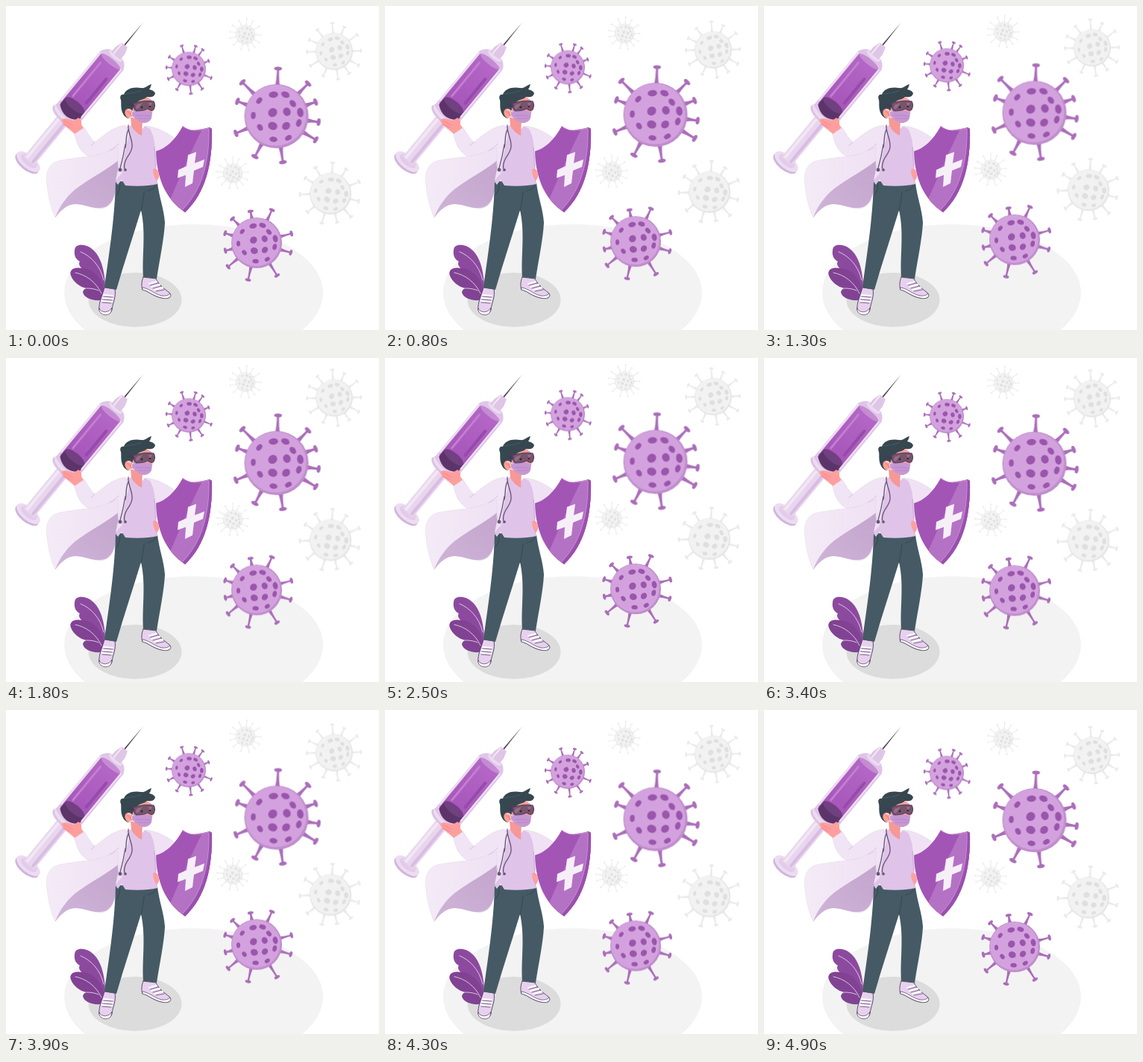
An HTML page for the animation above (5000 ms loop, 500 by 435 pixels).

```html
<!DOCTYPE html>
<html lang="en">
<head>
<meta charset="utf-8">
<title>Vaccine hero</title>
<style>
html, body { margin: 0; width: 100%; height: 100%; overflow: hidden; background: #fff; }
svg { display: block; width: 500px; height: 435px; }
.bob { animation: bob 2.5s cubic-bezier(.37, 0, .63, 1) infinite alternate; }
@keyframes bob { to { transform: translateY(calc(var(--rise) * -1px)); } }
</style>
</head>
<body>
<svg viewBox="0 0 500 435" xmlns="http://www.w3.org/2000/svg" fill="none" stroke-linecap="round" stroke-linejoin="round">
  <defs>
    <linearGradient id="liquid" x1="0" x2="1" y1="0" y2="0">
      <stop offset="0" stop-color="#a452b8"/><stop offset="1" stop-color="#b468c6"/>
    </linearGradient>
    <linearGradient id="lining" x1="1" x2="0" y1="0" y2="1">
      <stop offset="0" stop-color="#c3a4cd"/><stop offset="1" stop-color="#d0b5d8"/>
    </linearGradient>
    <linearGradient id="cloth" x1="0" x2="1" y1="0" y2="0">
      <stop offset="0" stop-color="#f4ebf7"/><stop offset="1" stop-color="#efe0f3"/>
    </linearGradient>
    <clipPath id="plate"><path d="M237 161C243 166 250 168 257 166Q266 165 273 163L276 165C277 211 268 251 240 277C216 261 202 234 201 195Q222 189 237 161Z"/></clipPath>
  </defs>

  <!-- floor -->
  <ellipse cx="251.500" cy="385" rx="173.500" ry="92" fill="#f3f3f3"/>
  <ellipse cx="173" cy="394.500" rx="62.500" ry="36.500" fill="#dcdcdc"/>

  <!-- leaves -->
  <path d="M92 328C92 321 100 319 108 322C122 327 132 345 133 376L130 380C124 369 117 363 108 357C100 352 96 347 99 343C93 340 91 334 92 328Z" fill="#8c4a9f"/>
  <path d="M87 362C84 354 92 350 101 352C118 352 130 367 132 384L127 395C114 396 104 391 103 384Q104 380 108 379C98 377 90 370 87 362Z" fill="#814293"/>
  <path d="M100 330C114 336 126 348 131 368M93 358C108 361 121 371 128 386M108 379Q118 379 124 382" stroke="#e7d2ec" stroke-width=".9"/>

  <!-- cape -->
  <path d="M149 190C128 203 98 202 70 208C57 212 53 223 55 240C57 258 60 271 66 284C72 275 80 266 92 265C105 265 114 272 127 272C139 271 145 262 148 245L158 190Z" fill="url(#cloth)" stroke="#e3d5e8" stroke-width=".5"/>
  <path d="M153 205C139 218 113 231 93 246C80 257 71 270 66 284C74 274 81 267 92 266C105 266 114 272 127 271C139 270 145 262 148 240Z" fill="url(#lining)"/>

  <!-- shoes -->
  <g stroke="#4c3b5e" stroke-width=".9">
    <path d="M132 378L146 380C148 391 143 398 142 408C140 416 127 416 125 408C124 398 129 389 132 378Z" fill="#e8d0ef"/>
    <path d="M125 406C127 412 138 413 142 405L141 410C139 417 127 416 125 409Z" fill="#fff" stroke-width=".7"/>
    <path d="M131 388L143 389M130 392L143 393M129 396L142 397" stroke="#fff" stroke-width="2"/>
    <path d="M131 390L143 391M130 394L142 395M129 398L141 399" stroke-width=".7"/>
    <path d="M184 364L201 366C205 375 213 380 219 385C224 391 217 394 209 392C197 390 190 382 183 381C181 375 182 369 184 364Z" fill="#e8d0ef"/>
    <path d="M183 378C192 379 199 387 209 389Q216 390 220 386C223 391 217 394 209 392C198 390 190 382 183 381Z" fill="#fff" stroke-width=".7"/>
    <path d="M192 373L202 370M195 377L206 374M199 381L210 378" stroke="#fff" stroke-width="2"/>
    <path d="M193 375L204 372M197 379L208 376M201 383L212 381" stroke-width=".7"/>
  </g>

  <!-- trousers -->
  <path d="M147 235L203 237C205 256 212 273 213 291C212 312 206 340 202 366L184 364C182 335 188 306 181 274C170 310 158 346 148 381L132 378C137 340 146 286 147 235Z" fill="#455a64"/>
  <path d="M181 275Q184 262 185 250M153 238Q153 249 148 254M202 240Q198 247 190 248" stroke="#364850" stroke-width="1"/>

  <!-- far arm and coat -->
  <path d="M188 161C204 163 218 171 229 180L222 193L207 193L200 220L196 190Z" fill="#f0e2f4" stroke="#e0d0e6" stroke-width=".5"/>

  <!-- shirt -->
  <path d="M160 163L168 160Q178 173 186 161L193 165C202 180 200 202 201 220L203 239Q185 243 160 241L155 233L150 240L147 236C152 213 153 188 160 163Z" fill="#e0c3e9"/>
  <path d="M199 190L202 235" stroke="#cca9d8" stroke-width="1"/>

  <!-- syringe, drawn along its own axis -->
  <g transform="translate(30 209) rotate(-50.500)">
    <ellipse cx="-3" rx="9" ry="19" fill="#d3b3dd"/>
    <ellipse cx="0" rx="9" ry="19" fill="#ecdcf1"/>
    <ellipse cx="1" rx="6" ry="13" fill="#e2cce9"/>
    <rect x="1" y="-9" width="88" height="18" fill="#e8d5ee"/>
    <path d="M4 5H88" stroke="#d8bce1" stroke-width="4"/>
    <path d="M4 -5H88" stroke="#f2e6f5" stroke-width="4"/>
    <ellipse cx="79" rx="9" ry="22" fill="#dcc2e4"/>
    <ellipse cx="82" rx="9" ry="21" fill="#ecdcf1"/>
    <path d="M82 -20H176Q185 -17 187 -8V8Q185 17 176 20H82Q73 0 82 -20Z" fill="#dfc5e7"/>
    <path d="M88 -17H174Q180 0 174 17H88Q78 0 88 -17Z" fill="url(#liquid)"/>
    <path d="M86 -16H98Q107 0 98 16H86Q73 0 86 -16Z" fill="#5d3469"/>
    <ellipse cx="98" rx="6" ry="16" fill="#714080"/>
    <ellipse cx="174" rx="4" ry="16" fill="#c48bd2"/>
    <path d="M106 -10H164" stroke="#c27fd1" stroke-width="3"/>
    <path d="M92 17H174" stroke="#efe1f3" stroke-width="2"/>
    <path d="M92 -18.500H174" stroke="#eedff3" stroke-width="2"/>
    <path d="M110 10H152" stroke="#964ba9" stroke-width="4"/>
    <ellipse cx="184" rx="4" ry="11" fill="#ecdcf1"/>
    <path d="M184 -8H193L203 -5V5L193 8H184Z" fill="#dfc6e7"/>
    <path d="M185 -4H201" stroke="#f2e8f5" stroke-width="2"/>
    <path d="M203 -.9L242 -.2L203 .9Z" fill="#4b4056"/>
  </g>

  <!-- raised arm -->
  <path d="M74 154C75 149 83 151 91 154L97 150Q102 153 101 159L106 167L94 174C88 166 79 164 74 154Z" fill="#ff9f9d"/>
  <path d="M78 154L89 160M77 158L87 163" stroke="#e98286" stroke-width=".8"/>
  <path d="M92 172L105 163C109 171 114 178 119 183C131 174 143 162 160 160L163 170C158 188 156 203 150 216L150 190C135 196 119 203 109 201C99 195 94 183 92 172Z" fill="#f1e4f5" stroke="#e0d0e6" stroke-width=".5"/>
  <path d="M119 183L114 187M151 185Q147 190 139 194" stroke="#cdb8d6" stroke-width=".8"/>
  <path d="M162 160Q159 185 152 211L147 234L155 225Q158 200 165 173Z" fill="#efe0f3"/>

  <!-- head -->
  <path d="M167 148L168 161Q173 170 182 174L183 152Z" fill="#f79896"/>
  <path d="M166 124Q181 115 195 126C199 139 196 153 186 157C174 157 167 147 166 124Z" fill="#ffa19b"/>
  <path d="M157 145C153 137 155 132 154 126C152 122 154 118 158 119C160 111 171 108 181 110C187 111 190 106 195 105Q194 109 192 112Q198 113 200 117C199 122 194 123 189 122C185 126 180 125 176 129C171 131 171 138 167 145L164 151Q159 149 157 145Z" fill="#37474f"/>
  <path d="M160 118Q171 117 181 114" stroke="#4c626b" stroke-width=".8"/>
  <path d="M168 139C161 135 157 142 161 148Q164 153 169 149Z" fill="#ff9f95"/>
  <path d="M163 142Q167 142 167 147" stroke="#db7479" stroke-width=".9"/>
  <path d="M169 141Q181 136 196 143L195 151Q192 157 184 157Q175 155 169 147Z" fill="#c698d3"/>
  <path d="M164 139L171 142M166 149L172 150" stroke="#f0e0f4" stroke-width="1.200"/>
  <path d="M175 147Q184 146 194 148M177 151Q185 151 193 151" stroke="#b27fc0" stroke-width=".7"/>
  <path d="M171 131Q184 126 198 128Q201 133 198 139Q195 142 190 138Q184 141 175 141Q170 138 171 131Z" fill="#775469" stroke="#5a3f68" stroke-width="1.200"/>
  <path d="M175 133L183 130L177 138H174ZM191 130L196 130L193 136Z" fill="#947085"/>
  <path d="M166 132L171 134" stroke="#4d345c" stroke-width="2.500"/>
  <circle cx="182" cy="136" r="1.400" fill="#312b39"/><circle cx="193" cy="135" r="1.300" fill="#312b39"/>

  <!-- stethoscope -->
  <g stroke="#655774" stroke-width="1.300">
    <path d="M164 160C163 170 170 179 169 189C168 198 163 200 160 208Q157 217 160 220M160 186C158 198 156 207 153 218M164 166C160 174 162 182 160 190"/>
    <circle cx="153" cy="220" r="1.800" fill="#655774"/><circle cx="160" cy="220" r="1.200" fill="#655774"/>
  </g>

  <!-- shield -->
  <g clip-path="url(#plate)">
    <rect x="198" y="158" width="82" height="122" fill="#a355b6"/>
    <path d="M280 160L266 160Q253 183 219 262L240 280L280 240Z" fill="#b472c4"/>
    <path d="M272 163C273 211 262 248 237 274L240 279C271 252 280 210 278 162Z" fill="#9a50ad"/>
    <path d="M237 162Q251 171 272 164C273 210 262 248 237 273" stroke="#c58bd2" stroke-width="1"/>
  </g>
  <path d="M244 200L255 196L253 211L266 206L264 216L252 221L250 238L240 243L241 227L230 231L231 220L242 215Z" fill="#f6eff8"/>
  <path d="M197 219Q203 217 204 223Q207 231 202 234Q197 230 197 219Z" fill="#ff9f9d"/>

  <g id="viruses"></g>
</svg>
<script>
const NS = 'http://www.w3.org/2000/svg';
const field = document.getElementById('viruses');
const purple = { body: '#d3a2de', edge: '#c08dcd', spot: '#9a55ac', spike: '#ab6dba' };
const grey = { body: '#f2f2f2', edge: '#e6e6e6', spot: '#dfdfdf', spike: '#ebebeb' };
// spot centres on a body of radius 43
const spots = [[-23,-21],[-4,-29],[12,-29],[22,-17],[-31,-1],[-5,-5],[14,-6],
  [30,9],[-22,15],[-5,13],[13,13],[-4,31],[16,29],[32,-5]];

function add(parent, tag, attrs) {
  const el = document.createElementNS(NS, tag);
  for (const k in attrs) el.setAttribute(k, attrs[k]);
  return parent.appendChild(el);
}

// spikes: [clockwise degrees from the top, length relative to the radius]
function virus(x, y, r, rise, color, turn, spikes) {
  const place = add(field, 'g', { transform: `translate(${x} ${y})` });
  const g = add(place, 'g', { class: 'bob', style: `--rise:${rise}` });
  for (const [deg, len] of spikes) {
    const s = add(g, 'g', { transform: `rotate(${deg})`, fill: color.spike });
    const end = -len * r, w = r * .033;
    add(s, 'path', { d: `M${-w * 2.4} ${-r * .95}Q${-w} ${-r * 1.1} ${-w} ${end}H${w}Q${w} ${-r * 1.1} ${w * 2.4} ${-r * .95}Z` });
    add(s, 'ellipse', { cy: end + r * .03, rx: r * .12, ry: r * .06 });
  }
  add(g, 'circle', { r, fill: color.edge });
  add(g, 'circle', { cx: -r * .02, cy: -r * .03, r: r * .95, fill: color.body });
  const pits = add(g, 'g', { transform: `rotate(${turn}) scale(${r / 43})`, fill: color.spot });
  spots.forEach(([px, py], i) => {
    const size = 4.8 + (i * 7 % 4) * .5;
    const flat = Math.sqrt(1 - (px * px + py * py) / 1849);
    const a = Math.atan2(py, px) * 180 / Math.PI;
    add(pits, 'ellipse', { rx: size * Math.max(.68, flat * .92), ry: size, transform: `translate(${px} ${py}) rotate(${a})` });
  });
}

const ring = (n, start, len) => Array.from({ length: n },
  (_, i) => [start + i * 360 / n + 4 * Math.sin(i * 5), len + .05 * Math.cos(i * 3)]);

virus(321, 38.5, 13, 7.5, grey, 20, ring(13, 5, 1.65));
virus(440, 61, 25, 9, grey, -10, ring(12, -4, 1.5));
virus(304, 224.5, 13, 9, grey, 35, ring(13, 0, 1.65));
virus(435, 252, 28, 9, grey, 10, ring(11, 4, 1.47));
virus(245, 84.5, 23, 9, purple, 10, [[-17,1.44],[17,1.42],[36,1.42],[68,1.28],[112,1.44],
  [146,1.44],[175,1.48],[210,1.42],[244,1.36],[274,1.33],[302,1.37]]);
virus(362.5, 148, 43, 8.5, purple, 0, [[2,1.52],[44,1.45],[70,1.33],[98,1.36],[121,1.46],
  [172,1.48],[208,1.46],[247,1.4],[291,1.33],[315,1.53]]);
virus(336, 318, 34, 8, purple, -4, [[-11,1.3],[25,1.46],[75,1.45],[106,1.43],[148,1.55],
  [193,1.53],[230,1.5],[256,1.3],[287,1.33],[315,1.38]]);
</script>
</body>
</html>
```
